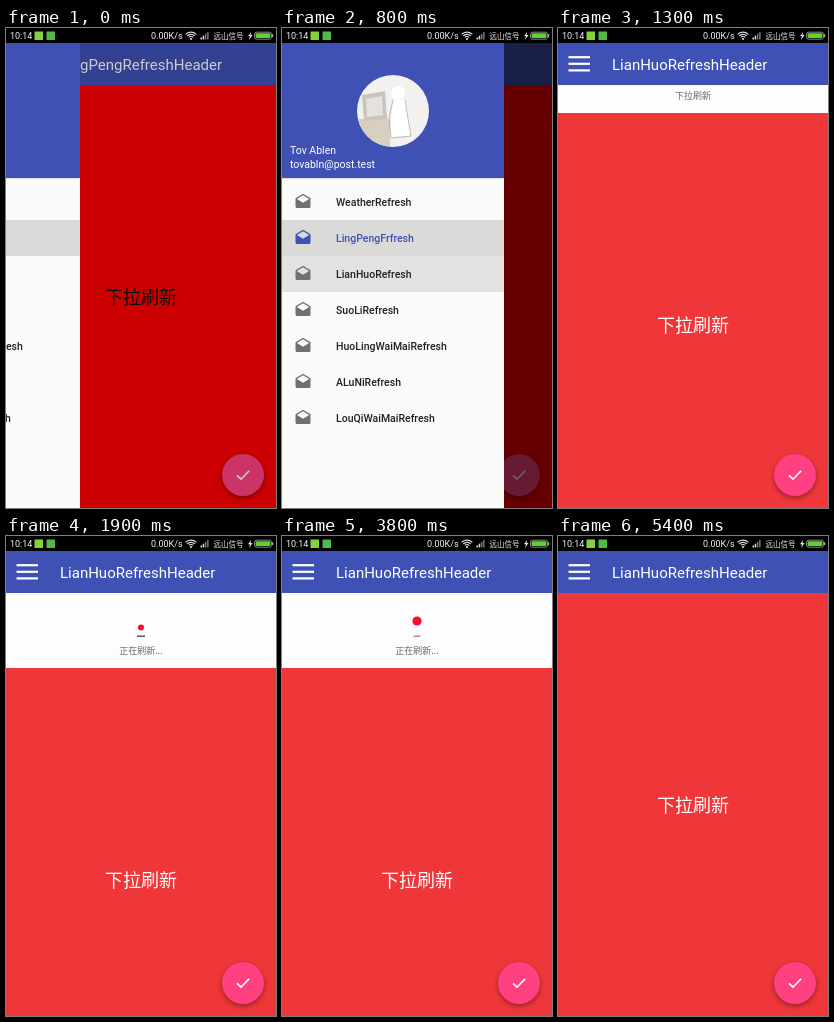
Write an HTML page with a canvas that moves like this. It is 270 px wide and 480 px high and loops after 5500 ms.

```html
<!DOCTYPE html>
<html lang="zh">
<head>
<meta charset="utf-8">
<title>Pull to refresh</title>
<style>
html, body { margin: 0; width: 100%; height: 100%; overflow: hidden; background: #000; }
canvas { display: block; width: 270px; height: 480px; }
</style>
</head>
<body>
<canvas id="stage"></canvas>
<script>
const W = 270, H = 480, LOOP = 5500, STEP = 100;
const DRAWER_W = 222, HEADER_H = 75, BAR_TOP = 15, BODY_TOP = 57;
const BLUE = '#3f51b5', PINK = '#ff4081';
const LATIN = 'Roboto, "Noto Sans", sans-serif';
const HAN = '"Noto Sans CJK SC", "Noto Sans CJK", sans-serif';
const PAGES = [
  { title: 'LingPengRefreshHeader', body: '#ff0000', ink: '#111' },
  { title: 'LianHuoRefreshHeader', body: '#ef373a', ink: '#fff' }
];
const MENU = ['WeatherRefresh', 'LingPengFrfresh', 'LianHuoRefresh', 'SuoLiRefresh',
  'HuoLingWaiMaiRefresh', 'ALuNiRefresh', 'LouQiWaiMaiRefresh'];
const MAIL = new Path2D('M22 8c0-.72-.37-1.35-.95-1.7L12 1 2.95 6.3C2.38 6.65 2 7.28 2 8v10' +
  'c0 1.1.9 2 2 2h16c1.1 0 2-.9 2-2V8zM12 13L3.74 7.84 12 3l8.26 4.84L12 13z');

const canvas = document.getElementById('stage');
const ctx = canvas.getContext('2d');
const dpr = window.devicePixelRatio || 1;
canvas.width = W * dpr;
canvas.height = H * dpr;

// Linear interpolation through [time, value] pairs.
function track(keys, t) {
  const i = keys.findIndex(k => k[0] > t);
  if (i === 0) return keys[0][1];
  if (i < 0) return keys[keys.length - 1][1];
  const [t0, a] = keys[i - 1], [t1, b] = keys[i];
  return a + (b - a) * (t - t0) / (t1 - t0);
}

function drawerEdge(t) {
  return track([[0, 74], [100, 160], [200, 208], [300, 222], [800, 222], [900, 105], [1000, 15], [1100, 0]], t);
}

function pullOffset(t) {
  if (t < 4900) {
    return track([[1100, 0], [1200, 6], [1300, 28], [1400, 58], [1500, 86],
      [1600, 102], [1700, 104], [1800, 84], [1900, HEADER_H]], t);
  }
  return HEADER_H * (1 - Math.min(1, (t - 4800) / 600)) ** 2;
}

function rect(x, y, w, h, color) {
  ctx.fillStyle = color;
  ctx.fillRect(x, y, w, h);
}

function disc(x, y, r, color) {
  ctx.fillStyle = color;
  ctx.beginPath();
  ctx.arc(x, y, r, 0, Math.PI * 2);
  ctx.fill();
}

function line(points, color, width) {
  ctx.strokeStyle = color;
  ctx.lineWidth = width;
  ctx.beginPath();
  points.forEach(([x, y]) => ctx.lineTo(x, y));
  ctx.stroke();
}

function polygon(points, color) {
  ctx.fillStyle = color;
  ctx.beginPath();
  points.forEach(([x, y]) => ctx.lineTo(x, y));
  ctx.fill();
}

function text(str, x, y, font, color, align = 'left', baseline = 'alphabetic') {
  ctx.font = font;
  ctx.fillStyle = color;
  ctx.textAlign = align;
  ctx.textBaseline = baseline;
  ctx.fillText(str, x, y);
}

function drawStatusBar() {
  rect(0, 0, W, BAR_TOP, '#000');
  text('10:14', 4, 11.2, '9px ' + LATIN, '#f2f2f2');
  rect(28.5, 3.5, 8.5, 8.5, '#86d13e');
  rect(40.5, 3.5, 8.5, 8.5, '#55b848');
  text('0.00K/s', 145, 11.2, '9px ' + LATIN, '#f2f2f2');
  ctx.lineCap = 'butt';
  for (const r of [3, 5.2, 7.4]) {
    ctx.strokeStyle = '#ddd';
    ctx.lineWidth = 1.2;
    ctx.beginPath();
    ctx.arc(185, 11.5, r, -Math.PI * 0.76, -Math.PI * 0.24);
    ctx.stroke();
  }
  disc(185, 11, 1.1, '#ddd');
  for (let i = 0; i < 4; i++) {
    const h = 2 + i * 1.8;
    rect(194.5 + i * 2.2, 11.5 - h, 1.5, h, i < 2 ? '#ddd' : '#777');
  }
  text('远山信号', 207.5, 10.5, '7.5px ' + HAN, '#f2f2f2');
  polygon([[245, 4], [242, 8.2], [244, 8.2], [243, 12], [246.5, 7], [244.5, 7]], '#eee');
  ctx.strokeStyle = '#aaa';
  ctx.lineWidth = 0.8;
  ctx.beginPath();
  ctx.roundRect(248.5, 4.2, 17, 7, 2);
  ctx.stroke();
  ctx.fillStyle = '#5bd52a';
  ctx.beginPath();
  ctx.roundRect(249.6, 5.3, 14.8, 4.8, 1);
  ctx.fill();
  rect(266, 6.2, 1.2, 3, '#aaa');
}

function drawFab() {
  ctx.save();
  ctx.shadowColor = 'rgba(0,0,0,.38)';
  ctx.shadowBlur = 5 * dpr;
  ctx.shadowOffsetY = 2 * dpr;
  disc(237, 447, 21, PINK);
  ctx.restore();
  line([[231, 447.4], [235, 451.2], [243.2, 442.8]], '#fff', 1.6);
}

function drawRefreshHeader(t, pull) {
  const top = BODY_TOP + pull - HEADER_H;
  const bouncing = t >= 1800 && t < 4500;
  const lift = bouncing ? (1 - Math.cos((t - 1900) / 400 * Math.PI * 2)) / 2 : 1;
  const size = t < 1800 ? Math.min(1, pull / HEADER_H) : 1;
  const label = t >= 4600 ? '刷新完成' : t >= 1800 ? '正在刷新...' : pull < HEADER_H ? '下拉刷新' : '松开刷新';
  rect(0, BODY_TOP, W, pull, '#fdfcff');
  disc(135, top + 73.5 - 13 * lift - 0, (3 + 3.2 * lift) * size, '#f5102f');
  const half = 4 - 1.3 * lift;
  const gray = Math.round(50 + 150 * lift);
  rect(135 - half, top + 81.5, half * 2, 1.2, `rgb(${gray},${gray},${gray})`);
  text(label, 135, top + 96, '9px ' + HAN, '#686868', 'center', 'middle');
}

function drawPage(page, t, pull) {
  if (pull > 0) {
    ctx.save();
    ctx.beginPath();
    ctx.rect(0, BODY_TOP, W, pull);
    ctx.clip();
    ctx.translate(0, 0);
    drawRefreshHeaderAt(t, pull);
    ctx.restore();
  }
  rect(0, BODY_TOP + pull, W, H, page.body);
  text('下拉刷新', 135, 269.5 + pull, '18px ' + HAN, page.ink, 'center', 'middle');
  rect(0, BAR_TOP, W, BODY_TOP - BAR_TOP, BLUE);
  for (const y of [29.2, 35.8, 42.4]) line([[10.5, y], [32, y]], '#fff', 2.2);
  text(page.title, 54, 41.5, '15px ' + LATIN, '#fff');
  drawFab();
}

// Header coordinates are laid out for the resting, fully pulled position.
function drawRefreshHeaderAt(t, pull) {
  rect(0, BODY_TOP, W, pull, '#fdfcff');
  ctx.translate(0, pull - HEADER_H);
  const bouncing = t >= 1800 && t < 4500;
  const lift = bouncing ? (1 - Math.cos((t - 1900) / 400 * Math.PI * 2)) / 2 : 1;
  const size = t < 1800 ? Math.min(1, pull / HEADER_H) : 1;
  const half = 4 - 1.3 * lift;
  const gray = Math.round(50 + 150 * lift);
  const label = t >= 4600 ? '刷新完成' : t >= 1800 ? '正在刷新...'
    : pull < HEADER_H ? '下拉刷新' : '松开刷新';
  disc(135, 91.5 - 13 * lift, (3 + 3.2 * lift) * size, '#f5102f');
  rect(135 - half, 99.6, half * 2, 1.2, `rgb(${gray},${gray},${gray})`);
  text(label, 135, 114.5, '9px ' + HAN, '#686868', 'center', 'middle');
}

function drawAvatar() {
  ctx.save();
  ctx.beginPath();
  ctx.arc(111, 83, 36, 0, Math.PI * 2);
  ctx.clip();
  rect(75, 47, 72, 72, '#f3f1ef');
  rect(75, 91, 33, 28, '#d8cfc0');
  polygon([[80, 67], [103, 63], [105, 91], [82, 93]], '#c9c4bd');
  polygon([[84, 71], [100, 68], [101, 87], [85, 89]], '#e5e2dd');
  polygon([[111, 72], [124, 72], [129, 108], [108, 110]], '#fff');
  line([[111, 72], [107, 90], [109, 110], [129, 108], [123, 72]], '#aaa', 0.8);
  disc(116, 65, 7, '#fff');
  ctx.restore();
}

function drawDrawer(edge, selected, pressed) {
  ctx.save();
  ctx.translate(edge - DRAWER_W, 0);
  rect(0, BAR_TOP, DRAWER_W, H, '#fafafa');
  rect(0, BAR_TOP, DRAWER_W, 135, BLUE);
  rect(0, 150, DRAWER_W, 0.8, '#d8d8d8');
  drawAvatar();
  text('Tov Ablen', 8, 126, '10.5px ' + LATIN, '#fff');
  text('tovabln@post.test', 8, 139.5, '10.5px ' + LATIN, '#fff');
  MENU.forEach((label, i) => {
    const y = 156 + i * 36, active = i === selected;
    if (active) rect(0, y, DRAWER_W, 36, '#dadad9');
    else if (i === pressed) rect(0, y, DRAWER_W, 36, '#e3e2e0');
    ctx.save();
    ctx.translate(12, y + 9);
    ctx.scale(0.75, 0.75);
    ctx.fillStyle = active ? BLUE : '#707070';
    ctx.fill(MAIL, 'evenodd');
    ctx.restore();
    text(label, 54, y + 22, '500 10.5px ' + LATIN, active ? BLUE : '#222');
  });
  ctx.restore();
}

function draw(t) {
  const switched = t >= 900;
  const edge = drawerEdge(t);
  ctx.setTransform(dpr, 0, 0, dpr, 0, 0);
  drawPage(PAGES[switched ? 1 : 0], t, pullOffset(t));
  if (edge > 0) {
    rect(0, BAR_TOP, W, H, `rgba(0,0,0,${0.6 * edge / DRAWER_W})`);
    drawDrawer(edge, switched ? 2 : 1, t >= 800 && !switched ? 2 : -1);
  }
  drawStatusBar();
}

const start = performance.now();
function tick() {
  const t = (performance.now() - start) % LOOP;
  draw(Math.floor(t / STEP) * STEP);
  requestAnimationFrame(tick);
}
tick();
</script>
</body>
</html>
```
